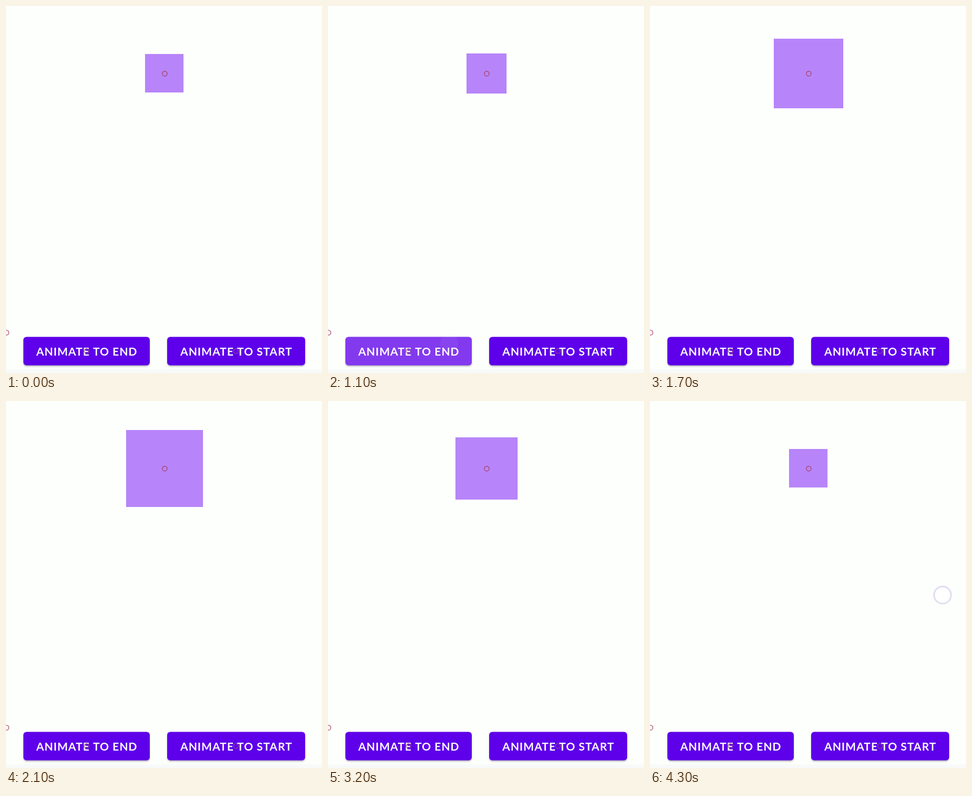
Animation of 600x696 px, one loop 4.4 s. Source, as an HTML page with a canvas:

```html
<!DOCTYPE html>
<html lang="en">
<head>
<meta charset="utf-8">
<title>Animate to end and start</title>
<style>
  html, body { margin: 0; width: 100%; height: 100%; overflow: hidden; background: #fdfffd; }
  canvas { display: block; width: 600px; height: 696px; }
</style>
</head>
<body>
<canvas id="stage" width="600" height="696"></canvas>
<script>
const ctx = document.getElementById('stage').getContext('2d');
const LOOP = 4400, STEP = 100;

const buttons = [
  { label: 'ANIMATE TO END', x: 33, w: 240, tapX: 230, tapY: 640, click: 960 },
  { label: 'ANIMATE TO START', x: 306, w: 262, tapX: 455, tapY: 643, click: 2797 }
];
const BTN_Y = 627.5, BTN_H = 54;

const clamp = v => Math.min(1, Math.max(0, v));
const ease = v => (1 - Math.cos(Math.PI * clamp(v))) / 2;

function circle(x, y, r) {
  ctx.beginPath();
  ctx.arc(x, y, r, 0, Math.PI * 2);
}

function marker(x, y, color) {
  ctx.lineWidth = 1.4;
  ctx.strokeStyle = color;
  circle(x, y, 4.6);
  ctx.stroke();
}

// Edges snap to whole pixels
function drawSquare(t) {
  const grow = ease((t - 960) / 1030) - ease((t - 2797) / 945);
  const half = 36.5 * (1 + grow);
  const left = Math.round(300.9 - half), right = Math.round(300.9 + half);
  const top = Math.round(127.9 - half), bottom = Math.round(127.9 + half);
  ctx.fillStyle = '#b785f9';
  ctx.fillRect(left, top, right - left, bottom - top);
}

function drawButton(b, t) {
  const age = t - b.click;
  const press = age < 0 ? 0 : clamp(age / 60) * clamp((330 - age) / 200);

  ctx.save();
  ctx.shadowColor = 'rgba(0, 0, 0, 0.28)';
  ctx.shadowBlur = 3;
  ctx.shadowOffsetY = 2;
  ctx.fillStyle = '#5e00e9';
  ctx.beginPath();
  ctx.roundRect(b.x, BTN_Y, b.w, BTN_H, 6);
  ctx.fill();
  ctx.restore();

  if (press > 0) {
    ctx.save();
    ctx.clip();
    ctx.fillStyle = `rgba(255, 255, 255, ${0.24 * press})`;
    circle(b.tapX, b.tapY, 30 + 230 * clamp(age / 90));
    ctx.fill();
    ctx.restore();
  }

  ctx.fillStyle = '#fff';
  ctx.fillText(b.label, b.x + b.w / 2 + 0.5, 662.5);
}

function drawTouch(x, y, alpha) {
  if (alpha <= 0) return;
  ctx.save();
  ctx.globalAlpha = alpha;
  ctx.fillStyle = 'rgba(255, 255, 255, 0.62)';
  circle(x, y, 16);
  ctx.fill();
  ctx.shadowColor = 'rgba(150, 130, 200, 0.4)';
  ctx.shadowBlur = 3;
  ctx.strokeStyle = 'rgba(212, 203, 235, 0.8)';
  ctx.lineWidth = 1.6;
  circle(x, y, 16.2);
  ctx.stroke();
  ctx.restore();
}

function draw(t) {
  ctx.fillStyle = '#fdfffd';
  ctx.fillRect(0, 0, 600, 696);
  ctx.fillStyle = '#f8faf9';
  ctx.fillRect(0, 689, 600, 7);

  drawSquare(t);
  ctx.font = 'bold 21px Lato, "Open Sans", sans-serif';
  ctx.letterSpacing = '1px';
  ctx.textAlign = 'center';
  ctx.textBaseline = 'alphabetic';
  buttons.forEach(b => drawButton(b, t));

  marker(301.4, 128.3, '#a8426f');
  marker(0.8, 619.5, '#b25878');
  marker(153, 654.3, 'rgba(150, 85, 115, 0.85)');
  marker(436.8, 654.3, 'rgba(150, 85, 115, 0.85)');

  for (const b of buttons) {
    const age = t - b.click;
    if (age >= -100) drawTouch(b.tapX, b.tapY, clamp((150 - age) / 130));
  }
  if (t >= 4200) drawTouch(555.5, 368, 1);
}

function tick(now) {
  draw(Math.floor((now % LOOP) / STEP) * STEP);
  requestAnimationFrame(tick);
}
requestAnimationFrame(tick);
</script>
</body>
</html>
```
